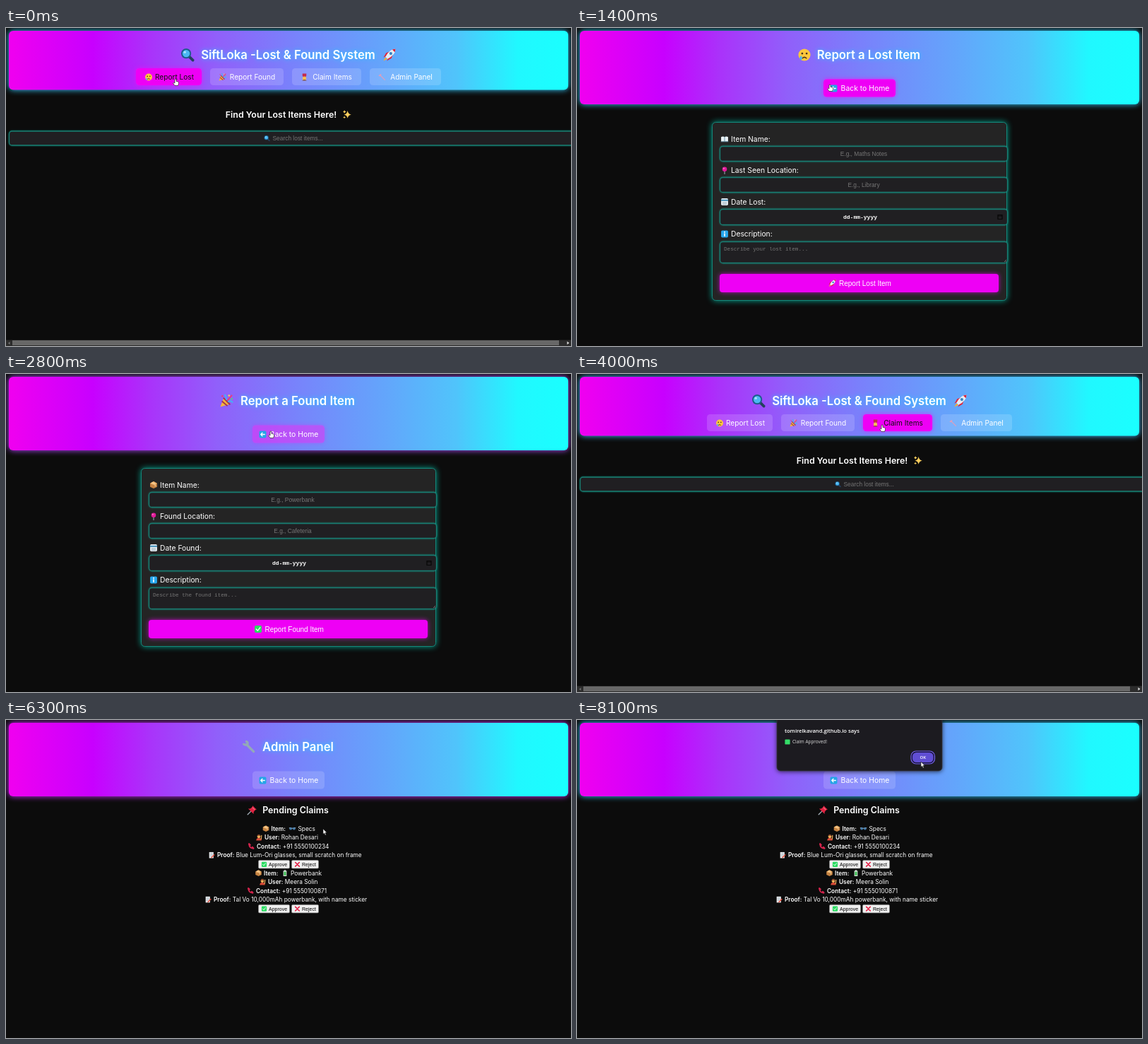
Recreate the animation shown at these times as an HTML page. Size 800 px wide and 450 px high, loop 8200 ms.

```html
<!DOCTYPE html>
<html lang="en">
<head>
<meta charset="utf-8">
<title>Lost and found</title>
<style>
html, body { margin: 0; width: 100%; height: 100%; overflow: hidden; background: #0c0c0c; }
svg { display: block; width: 100vw; height: 100vh; }
text { font-family: Inter, sans-serif; fill: #fff; white-space: pre; }
.arial { font-family: "Liberation Sans", Arial, sans-serif; }
.mono { font-family: "Liberation Mono", monospace; }
.sans { font-family: "Open Sans", sans-serif; }
.title { filter: drop-shadow(0 0 3px #2cf); }
.card { filter: drop-shadow(0 0 4px #0fd9); }
.field { filter: drop-shadow(0 0 1px #0fd6); }
.pink { filter: drop-shadow(0 0 3px #f0fa); }
.dialog { filter: drop-shadow(0 1px 3px #000a); }
</style>
</head>
<body>
<svg id="stage" viewBox="0 0 800 450" preserveAspectRatio="none"></svg>
<script>
const LOOP = 8200, STEP = 100, PULSE = 1000, FADE = 300, ALERT = 7300;
const MAGENTA = [238, 0, 245];

// Icons live in a 20 x 20 box centred on the origin.
const box = (fill, body = '') => `<rect x="-9" y="-9" width="18" height="18" rx="3" fill="${fill}"/>${body}`;
const line = (d, stroke, w = 2.5) =>
  `<path d="${d}" fill="none" stroke="${stroke}" stroke-width="${w}" stroke-linecap="round" stroke-linejoin="round"/>`;
const fill = (d, color) => `<path d="${d}" fill="${color}"/>`;
const dot = (x, y, r, color) => `<circle cx="${x}" cy="${y}" r="${r}" fill="${color}"/>`;

const ICONS = {
  search: line('M3 3L8 8', '#24415e', 4) + dot(-2, -2, 7.5, '#1d5c8a') + dot(-2, -2, 5.5, '#4bb8f3') + dot(-4, -4, 1.8, '#a8e4ff'),
  rocket: fill('M-5 2L-9 4L-5 -3L1 -5ZM-2 5L-4 9L3 5L5 -1Z', '#e0243c') + fill('M9 -9Q0 -9 -6 3L-3 6Q9 0 9 -9Z', '#e6eef5') +
    fill('M9 -9L4 -8L8 -4Z', '#d9223d') + dot(2, -2, 2.2, '#3583c4') + fill('M-6 4L-9 9L-3 6Z', '#ffad2d'),
  face: dot(0, 0, 9, '#ffc83d') + dot(-3.3, -2, 1.5, '#4a3420') + dot(3.3, -2, 1.5, '#4a3420') +
    line('M-3 5Q0 2 3 5', '#4a3420', 1.6) + fill('M-5 1Q-9 6 -5 8Q-2 6 -5 1Z', '#45b5f0'),
  party: fill('M-9 9L-4 -4L5 5Z', '#f5b53a') + line('M-6 1L1 7M-4 -4L5 5', '#a3354e', 2) + line('M0 -2Q0 -6 -2 -9M3 1Q7 -1 9 2', '#42b3f5', 2) +
    line('M2 -1L8 -8', '#ed3d74', 2) + dot(4, -8, 1.3, '#ffd94a') + dot(8, -3, 1.3, '#52d17c') + dot(-6, -7, 1.3, '#ed3d74'),
  badge: fill('M-5 -9H5V-3L2 1H-2L-5 -3Z', '#c32b4f') + dot(0, 3, 4.7, '#f3bd55') + fill('M-6 9Q0 4 6 9Z', '#8a5230'),
  wrench: line('M-4 -4L7 7', '#93a9b8', 3.6) + line('M-8 -4Q-4 -1 -2 -4Q-1 -7 -4 -8', '#93a9b8', 3),
  tool: line('M-6 -6L7 7M-8 -4Q-4 -2 -3 -7', '#e89cb5', 2),
  spark: fill('M1 -8Q2 0 9 1Q2 2 1 9Q0 2 -7 1Q0 0 1 -8ZM-6 -9Q-5 -6 -2 -5.5Q-5 -5 -6 -2Q-7 -5 -9 -5.5Q-7 -6 -6 -9ZM-6 4L-5 6L-3 7L-5 8L-6 9L-7 8L-9 7L-7 6Z', '#ffcf5c'),
  book: fill('M-9 -5Q-4 -8 0 -5Q4 -8 9 -5V7H-9Z', '#e8f1f5') + line('M0 -5V6M-9 7H9', '#56839a', 1.6),
  drop: line('M0 0V9', '#98a3b0', 2) + dot(0, -3, 6, '#e01a9a') + dot(-2, -5, 1.7, '#ff81cc'),
  cal: box('#e8eef2', fill('M-9 -6H9V-2H-9Z', '#4a94bc') + line('M-5 2H5M-5 6H5', '#8ca5b4', 1.7)),
  info: box('#26a7ee', line('M0 -1V5', '#fff', 3) + dot(0, -5, 1.8, '#fff')),
  parcel: fill('M0 -9L9 -4V5L0 9L-9 5V-4Z', '#c58342') + fill('M0 -9L9 -4L0 0L-9 -4Z', '#efb56f') + line('M-4 -6L4 -2V3', '#f9d7a1', 2),
  check: box('#2bdc62', line('M-5 0L-1 4L5 -4', '#eafff0', 2.5)),
  green: box('#34dd68'),
  push: line('M-2 2L-9 9', '#abb6bf', 1.8) + fill('M1 -9L9 -1L6 0L3 4L3 8L-8 -3L-4 -3L0 -6Z', '#df2442') + line('M1 -5L5 -1', '#ff7089', 1.5),
  specs: dot(-5, 0, 4, '#3f75a4') + dot(5, 0, 4, '#3f75a4') + line('M-2 -1H2M-9 -2H-7M7 -2H9', '#a9c3d9', 1.8),
  person: fill('M-8 9Q-7 1 0 2Q7 1 8 9Z', '#d84b38') + dot(0, -3, 5, '#f4b45b') + line('M7 5L8 -6', '#f4b45b', 2.4) + fill('M-5 -3Q-5 -9 0 -9Q5 -9 5 -3Q0 -7 -5 -3Z', '#8c4b2c'),
  phone: line('M-6 -6Q-5 5 6 6', '#d2244c', 4) + line('M-6 -7L-3 -4M7 6L4 3', '#d2244c', 5),
  note: fill('M-7 -9H6V9H-7Z', '#edf0f2') + line('M-4 -5H3M-4 -1H3M-4 3H0', '#92a3b0', 1.5) + line('M8 -1L0 7', '#e34e3d', 3),
  battery: fill('M-5 -7H-2V-9H2V-7H5V9H-5Z', '#d5e2d7') + fill('M-3 -4H3V7H-3Z', '#39bd50'),
  back: box('#25a5e6', line('M5 0H-5M-1 -4L-5 0L-1 4', '#fff', 2.4)),
  cross: line('M-7 -7L7 7M7 -7L-7 7', '#e51e45', 4)
};

const icon = (name, x, y, size = 10) => `<g transform="translate(${x} ${y}) scale(${size / 20})">${ICONS[name]}</g>`;

function text(x, y, str, size, o = {}) {
  const { w = 400, at = 'start', color = '#fff', cls = '', id = '' } = o;
  return `<text ${id && `id="${id}"`} class="${cls}" x="${x}" y="${y}" font-size="${size}" font-weight="${w}" text-anchor="${at}" style="fill:${color}">${str}</text>`;
}
const mid = (x, y, str, size, o) => text(x, y, str, size, { at: 'middle', ...o });
const rect = (x, y, w, h, r, attrs) => `<rect x="${x}" y="${y}" width="${w}" height="${h}" rx="${r}" ${attrs}/>`;
const page = (id, body) => `<g id="${id}">${body}</g>`;
const title = (x, str) => mid(x, 44, str, 16.7, { w: 600, cls: 'title' });

function navButton(id, x, y, w, h, symbol, iconX, labelX, label, size) {
  return rect(x, y, w, h, 4.5, 'fill="#fff" fill-opacity=".15"') +
    rect(x, y, w, h, 4.5, `id="${id}Hot" class="pink" fill="rgb(${MAGENTA})"`) +
    icon(symbol, iconX, y + h / 2 + .5, 11) +
    mid(labelX, y + h / 2 + 3.8, label, size, { id: id + 'Text' });
}

const field = (y, h, x = 202, w = 408) =>
  rect(x + .5, y + .5, w - 1, h - 1, 4, 'class="field" fill="#201f22" stroke="#197d72" stroke-width="1.3"');

function form(kind, symbol, names, places, sample, submitIcon, submitX) {
  const gray = { color: '#757575', cls: 'arial' };
  const labels = [['Item Name:', symbol], [names, 'drop'], ['Date ' + kind + ':', 'cal'], ['Description:', 'info']];
  const tops = [156.5, 201, 245.5, 291];
  return rect(191.5, 133.5, 417, 252, 5, 'class="card" fill="#242424" stroke="#14877b"') +
    labels.map(([label, pic], i) => icon(pic, 209, tops[i] + .5, 11) + text(218, tops[i] + 4, label, 10.3)).join('') +
    field(167, 22) + field(211, 22) + field(256, 23) + field(302, 31) +
    mid(406, 180.5, 'E.g., ' + sample, 8.4, gray) + mid(406, 225, 'E.g., ' + places, 8.4, gray) +
    mid(401, 270, 'dd-mm-yyyy', 8, { w: 700, cls: 'mono' }) +
    `<path d="M596 264.5h6v6h-6zM596 266h6" fill="none" stroke="#080808" stroke-width="1.2"/>` +
    text(208, 315, kind === 'Lost' ? 'Describe your lost item...' : 'Describe the found item...', 7.65, { color: '#757575', cls: 'mono' }) +
    `<path d="M605 331l3-3M607 331l1-1" stroke="#aaa" stroke-width=".6"/>` +
    rect(202, 348, 395, 26, 4, `class="pink" fill="rgb(${MAGENTA})"`) +
    icon(submitIcon, submitX, 361, 11) +
    text(submitX + 9.5, 364.7, `Report ${kind} Item`, 10, { cls: 'arial' });
}

function row(y, x, symbol, label, value) {
  return icon(symbol, x, y - 3, 9.5) +
    text(x + 8, y, `<tspan font-weight="600">${label}:</tspan> ${value}`, 8.3);
}

function grayButton(x, y, w, symbol, label) {
  return rect(x + .5, y + .5, w - 1, 11.5, 1.5, 'fill="#efefef" stroke="#858585" stroke-width=".7"') +
    icon(symbol, x + 8.5, y + 6.3, 8) + text(x + 15, y + 8.9, label, 7, { color: '#000', cls: 'arial' });
}

function claim(y, x, item, itemIcon, user, phone, proof) {
  return icon('parcel', x[0], y - 3, 9.5) + text(x[0] + 7.5, y, 'Item:', 8.3, { w: 600 }) +
    icon(itemIcon, x[0] + 37.5, y - 3, 9.5) + text(x[0] + 45.5, y, item, 8.3) +
    row(y + 12.5, x[1], 'person', 'User', user) +
    row(y + 25, x[2], 'phone', 'Contact', phone) +
    row(y + 37.5, x[3], 'note', 'Proof', proof) +
    grayButton(357, y + 41.3, 45, 'check', 'Approve') + grayButton(404, y + 41.3, 39, 'cross', 'Reject');
}

const stops = [[0, '#f000f0'], [.15, '#c800ff'], [.25, '#aa32fa'], [.37, '#915ffa'], [.5, '#7a80fb'],
  [.68, '#62a7fb'], [.8, '#50c4fb'], [.91, '#20f8ff'], [1, '#1affff']];

const home = title(399.5, 'SiftLoka -Lost &amp; Found System') + icon('search', 257, 38, 19) + icon('rocket', 543, 38, 19) +
  navButton('lost', 184, 57, 93, 24, 'face', 202, 238.5, 'Report Lost', 10.1) +
  navButton('found', 289, 57, 104, 24, 'party', 306.5, 349, 'Report Found', 10.1) +
  navButton('claim', 405, 57, 98, 24, 'badge', 422.5, 462, 'Claim Items', 10.1) +
  navButton('admin', 515, 57, 101, 24, 'tool', 532.5, 574, 'Admin Panel', 10.1) +
  mid(389.5, 126.5, 'Find Your Lost Items Here!', 12.4, { w: 600 }) + icon('spark', 483, 122, 13) +
  field(145.5, 21, 4, 812) + icon('search', 369.5, 156, 8.5) +
  text(377.5, 159, 'Search lost items...', 8.4, { color: '#757575', cls: 'arial' }) +
  rect(0, 441.5, 800, 8.5, 0, 'fill="#2c2c2c"') + rect(9, 442, 774, 7, 0, 'fill="#686868"') +
  '<path d="M5.5 444v4l-2.5-2z" fill="#777"/><path d="M794.5 443.500v4.500l3-2.250z" fill="#ddd"/>';

const admin = title(413.5, 'Admin Panel') + icon('wrench', 344, 38, 19) +
  icon('push', 348.5, 127.500, 14) + mid(410, 132, 'Pending Claims', 12.5, { w: 600 }) +
  claim(156.7, [368, 358, 347, 291], 'Specs', 'specs', 'Rohan Desari', '+91 5550100234', 'Blue Lum-Ori glasses, small scratch on frame') +
  claim(219.6, [357.5, 363, 346, 286], 'Powerbank', 'battery', 'Meera Solin', '+91 5550100871', 'Tal Vo 10,000mAh powerbank, with name sticker');

const dialog = rect(283, -8, 234, 80, 5, 'class="dialog" fill="#1c1b20" stroke="#3a393f" stroke-width=".7"') +
  text(294, 18.3, 'tomirelkavand.github.io says', 7.6, { w: 600, cls: 'sans' }) +
  icon('green', 298, 31, 8) + text(305, 33.2, 'Claim Approved!', 6.4, { cls: 'sans', color: '#ddd' }) +
  rect(473, 44, 33.5, 18, 7, 'fill="#19143f" stroke="#7562e8" stroke-width="1.2"') +
  rect(475, 46, 29.5, 14, 5.5, 'fill="#604ed3"') + mid(489.7, 55.4, 'OK', 6, { w: 600, cls: 'sans' });

document.getElementById('stage').innerHTML =
  `<defs><linearGradient id="neon">${stops.map(([o, c]) => `<stop offset="${o}" stop-color="${c}"/>`).join('')}</linearGradient></defs>` +
  rect(0, 0, 800, 450, 0, 'fill="#0c0c0c"') +
  rect(4, 4, 792, 104, 6, 'id="header" fill="url(#neon)"') +
  page('homePage', home) +
  page('lostPage', title(413, 'Report a Lost Item') + icon('face', 322, 38, 19) +
    form('Lost', 'book', 'Last Seen Location:', 'Library', 'Maths Notes', 'rocket', 361.5)) +
  page('foundPage', title(413, 'Report a Found Item') + icon('party', 312, 38, 19) +
    form('Found', 'parcel', 'Found Location:', 'Cafeteria', 'Powerbank', 'check', 357)) +
  page('claimPage', title(413, 'Claim Items') + icon('badge', 347, 38, 19)) +
  page('adminPage', admin) +
  page('backLink', navButton('back', 349, 72.5, 102, 25, 'back', 363.5, 408, 'Back to Home', 10.4)) +
  page('dialog', dialog) +
  `<g id="cursor" stroke="#111" stroke-width=".6" fill="#fff" stroke-linejoin="round">
    <path id="hand" d="M-1 .5Q0-.6 1 .5V3.500Q4 3.300 4.500 5V7L3.500 9.500H-1L-3.500 6Q-3 4.500-1 6Z"/>
    <path id="arrow" d="M0 0V7.500L1.700 6L3 9L4.300 8.400L3 5.600H5.300Z"/></g>`;

const cuts = [[-800, 'home'], [600, 'lost'], [1600, 'home'], [2500, 'found'], [3250, 'home'],
  [4150, 'claim'], [4850, 'home'], [6100, 'admin']];
const hovers = [['lost', -900, 600], ['back', 1000, 1600], ['found', 1750, 2500], ['back', 2670, 3250],
  ['claim', 3600, 4150], ['back', 4400, 4850], ['claim', 4850, 5100], ['admin', 5350, 6100]];
const path = [[0, 240, 72], [700, 240, 72], [1150, 358, 80], [1650, 358, 80], [2000, 340, 72], [2500, 340, 72],
  [2720, 375, 81], [3280, 375, 81], [3750, 432, 72], [4200, 432, 72], [4500, 427, 78], [5000, 427, 78],
  [5450, 562, 71], [6100, 562, 71], [6300, 449, 154], [7050, 380, 264], [7350, 380, 264], [8000, 487, 59], [8200, 487, 59]];

const $ = id => document.getElementById(id);
const clamp = v => Math.max(0, Math.min(1, v));
const mix = (a, b, k) => `rgb(${a.map((v, i) => Math.round(v + (b[i] - v) * k))})`;
const show = (id, on) => $(id).style.display = on ? '' : 'none';

function cursorAt(t) {
  const i = Math.max(1, path.findIndex(p => p[0] > t));
  const [t0, x0, y0] = path[i - 1], [t1, x1, y1] = path[i];
  const u = clamp((t - t0) / (t1 - t0)), k = u * u * (3 - 2 * u);
  return [x0 + (x1 - x0) * k, y0 + (y1 - y0) * k];
}

function hoverAt(id, t, loaded) {
  return Math.max(0, ...hovers.filter(h => h[0] === id && h[2] > loaded).map(([, on, off]) =>
    t < off ? clamp((t - on) / FADE) : 1 - clamp((t - off) / FADE)));
}

function draw(t) {
  const [loaded, name] = cuts.filter(c => c[0] <= t).pop();
  for (const id of ['home', 'lost', 'found', 'claim', 'admin']) show(id + 'Page', id === name);
  show('backLink', name !== 'home');
  show('dialog', t >= ALERT);

  // The alert also freezes the header's pulse.
  const phase = (Math.min(t, ALERT) - loaded) / PULSE % 2;
  const glow = mix([255, 0, 255], [0, 255, 255], phase < 1 ? phase : 2 - phase);
  $('header').setAttribute('height', name === 'home' ? 83.5 : 104);
  $('header').style.filter = `drop-shadow(0 0 4px ${glow})`;

  for (const id of ['lost', 'found', 'claim', 'admin', 'back']) {
    const k = hoverAt(id, t, loaded);
    $(id + 'Hot').style.opacity = k;
    if (id !== 'back') $(id + 'Text').style.fill = mix([255, 255, 255], [17, 17, 17], k);
  }

  const [x, y] = cursorAt(t);
  const linked = hovers.some(([, on, off]) => t >= on && t < off);
  $('cursor').setAttribute('transform', `translate(${x} ${y})`);
  show('hand', linked);
  show('arrow', !linked);
}

const start = performance.now();
function tick() {
  const t = (performance.now() - start) % LOOP;
  draw(Math.floor(t / STEP) * STEP);
  requestAnimationFrame(tick);
}
tick();
</script>
</body>
</html>
```
